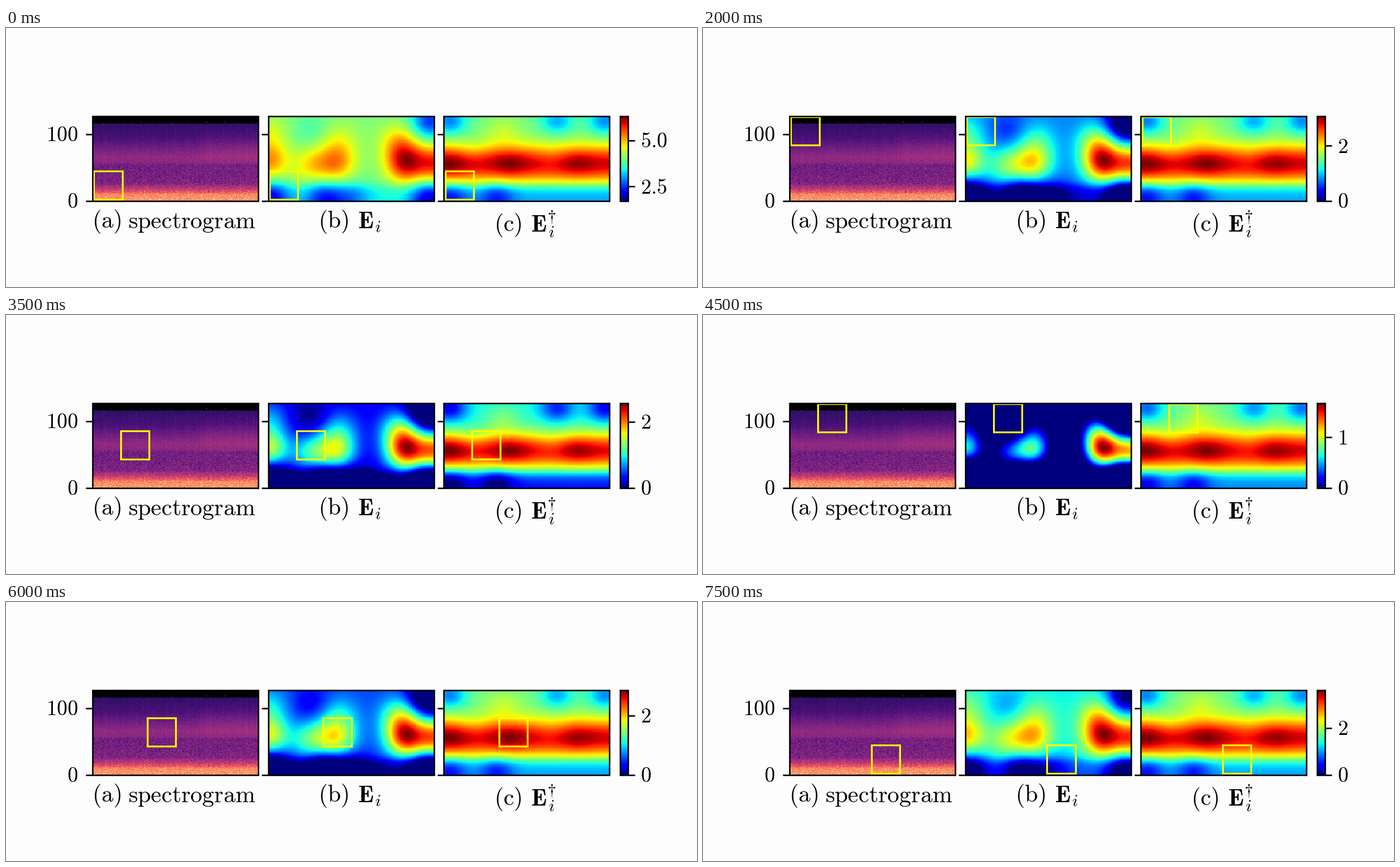
A matplotlib script that plays this animation: 1222 by 458 pixels, repeating every 8000 ms.

```python
import numpy as np
import matplotlib.pyplot as plt
from matplotlib.animation import FuncAnimation
from matplotlib.patches import Rectangle

plt.rcParams["mathtext.fontset"] = "cm"

W, H, DPI = 1222, 458, 64
PT = 72 / DPI                      # points per pixel
COLS, ROWS = 250, 128
TOP, BOTTOM, PANEL_W = 156, 305.7, 293
PANELS = [153 + 310.7 * n for n in range(3)]
BAR = (1086, 1100)
LINE, TICK = 2.6, 11.7
FRAMES, ROW_STEPS = 16, 5          # the window climbs five rows per column
FULL_SPAN = 4.61

u, v = np.meshgrid(np.linspace(0, PANEL_W, COLS), np.linspace(0, 150, ROWS))


def floor_drop(depth):
    return depth / (1 + np.exp((122.5 - v) / 4.8))


def bumps(points, sx, sy):
    """Sum of Gaussians given as (x, y, height)."""
    return sum(a * np.exp(-((u - x) / sx) ** 2 - ((v - y) / sy) ** 2)
               for x, y, a in points)


def field_e():
    warm = [(0, 80, .26), (0, 30, .10), (75, 88, .16), (119, 84, .25),
            (125, 45, .10), (243, 84, .40), (296, 84, .36), (232, 48, .20)]
    cold = [(75, 25, -.06), (285, 8, -.33), (2, 146, -.30),
            (98, 146, -.24), (145, 148, -.14), (285, 148, -.33)]
    return .5 - floor_drop(.12) + bumps(warm + cold, 34, 34)


def field_e_dagger():
    band = .47 + .45 * np.exp(-((v - 84) / 34) ** 2) - floor_drop(.22)
    warm = [(10, 85, .09), (116, 84, .08), (237, 84, .06), (105, 25, .08)]
    cold = [(50, 60, -.05), (190, 70, -.05), (10, 8, -.25), (200, 8, -.20),
            (285, 8, -.24), (10, 142, -.17), (93, 142, -.16)]
    return band + bumps(warm + cold, 30, 25)


def spectrogram():
    rng = np.random.default_rng(4)
    r = np.arange(ROWS)[:, None]
    x = np.linspace(0, 1, COLS)
    level = np.interp(r, [0, 9, 16, 27, 54, 57, 66, 95, 117],
                      [.79, .76, .56, .36, .33, .39, .41, .23, .17])
    noise = np.where(r < 56, .055, .02)
    img = level + noise * rng.standard_normal((ROWS, COLS))
    img += .008 * rng.standard_normal(COLS)
    img += .045 / (1 + np.exp((.64 - x) * 40)) * np.exp(-((r - 80) / 25) ** 2)
    img[117:] = 0
    img[117:120][rng.random((3, COLS)) < .05] = .22
    return np.clip(img, 0, 1)[::-1]


def bar_range(k):
    low = max(0, 1.71 - .75 * k)
    high = np.interp(k, [0, 4, 5, 7, 9, 10, 11, 15],
                     [6.32, 3.07, 4.4, 2.56, 1.67, 4.2, 2.6, 3.6])
    return low, high


fig = plt.figure(figsize=(W / DPI, H / DPI), dpi=DPI, facecolor="#fdfdfd")
ax = fig.add_axes([0, 0, 1, 1])
ax.axis("off")


def picture(data, left, right, cmap):
    return ax.imshow(data, extent=(left, right, BOTTOM, TOP), cmap=cmap, vmin=0,
                     vmax=1, interpolation="nearest", aspect="auto", zorder=1)


def outline(left, right):
    ax.add_patch(Rectangle((left, TOP), right - left, BOTTOM - TOP, fill=False,
                           ec="black", lw=LINE * PT, joinstyle="miter", zorder=4))


def tick(x, y):
    return ax.plot([x, x + TICK], [y, y], color="black", lw=LINE * PT,
                   solid_capstyle="butt", zorder=4)[0]


def label(x, y, tex, size=42, ha="center"):
    return ax.text(x, y, f"${tex}$", fontsize=size * PT, ha=ha, va="baseline",
                   color="black", zorder=5)


def roman(s):
    return r"\mathrm{%s}" % s


field_b, field_c = field_e(), field_e_dagger()
images = [picture(img, left, left + PANEL_W, cmap)
          for img, left, cmap in zip((spectrogram(), field_b, field_c), PANELS,
                                     ("magma", "jet", "jet"))]
picture(np.linspace(1, 0, 256)[:, None], *BAR, "jet")
outline(*BAR)

windows = []
for left in PANELS:
    outline(left, left + PANEL_W)
    for y in (188, BOTTOM):
        tick(left - TICK, y)
    win = Rectangle((0, 0), 50.2, 50, fill=False, ec="#ffff00", lw=3.2 * PT,
                    joinstyle="miter", zorder=3)
    ax.add_patch(win)
    win.set_clip_path(Rectangle((left, TOP), PANEL_W, BOTTOM - TOP,
                                transform=ax.transData))
    windows.append(win)

label(127.3, 200, roman("100"), 37, "right")
label(127.3, 318, roman("0"), 37, "right")
label(177.5, 353.5, roman("(a)"))
label(328.7, 353.5, roman("spectrogram"))
label(579, 353.5, roman("(b)"))
label(636.5, 353.5, r"\mathbf{E}")
label(657, 361, "i", 30)
label(887.5, 359.5, roman("(c)"))
label(942.5, 359.5, r"\mathbf{E}")
label(965, 341, r"\dagger", 30)
label(964, 370.5, "i", 30)

bar_ticks = [(tick(BAR[1], BOTTOM), label(1121.5, BOTTOM, "0", 37, "left"))
             for _ in range(2)]

ax.set_xlim(0, W)
ax.set_ylim(H, 0)


def set_bar_ticks(low, high):
    span = high - low
    step = 2.5 if span > 4 else 2 if span > 2 else 1
    first = np.ceil(low / step) * step
    for n, (line, text) in enumerate(bar_ticks):
        value = first + n * step
        y = BOTTOM - (value - low) / span * (BOTTOM - TOP)
        line.set_ydata([y, y])
        text.set_y(y + 12.5)
        text.set_text("$%s$" % roman("%.1f" % value if step == 2.5 else "%d" % value))
        for part in (line, text):
            part.set_visible(value <= high)


def stretch(field, gain):
    """Raise the contrast below the peak and cut off at zero."""
    return np.clip(1 - (1 - field) * gain, 0, 1)


def update(k):
    low, high = bar_range(k)
    images[1].set_data(stretch(field_b, FULL_SPAN / (high - low)))
    images[2].set_data(stretch(field_c, .96 + .2 * np.exp(-((k - 7) / 1.5) ** 2)))
    set_bar_ticks(low, high)
    col, row = divmod(k, ROW_STEPS)
    for left, win in zip(PANELS, windows):
        win.set_xy((left + 2.4 + 47.4 * col, 253 - 24 * row))
    return images + windows


anim = FuncAnimation(fig, update, frames=FRAMES, interval=500, repeat=True,
                     repeat_delay=0, blit=False)
plt.show()
```
